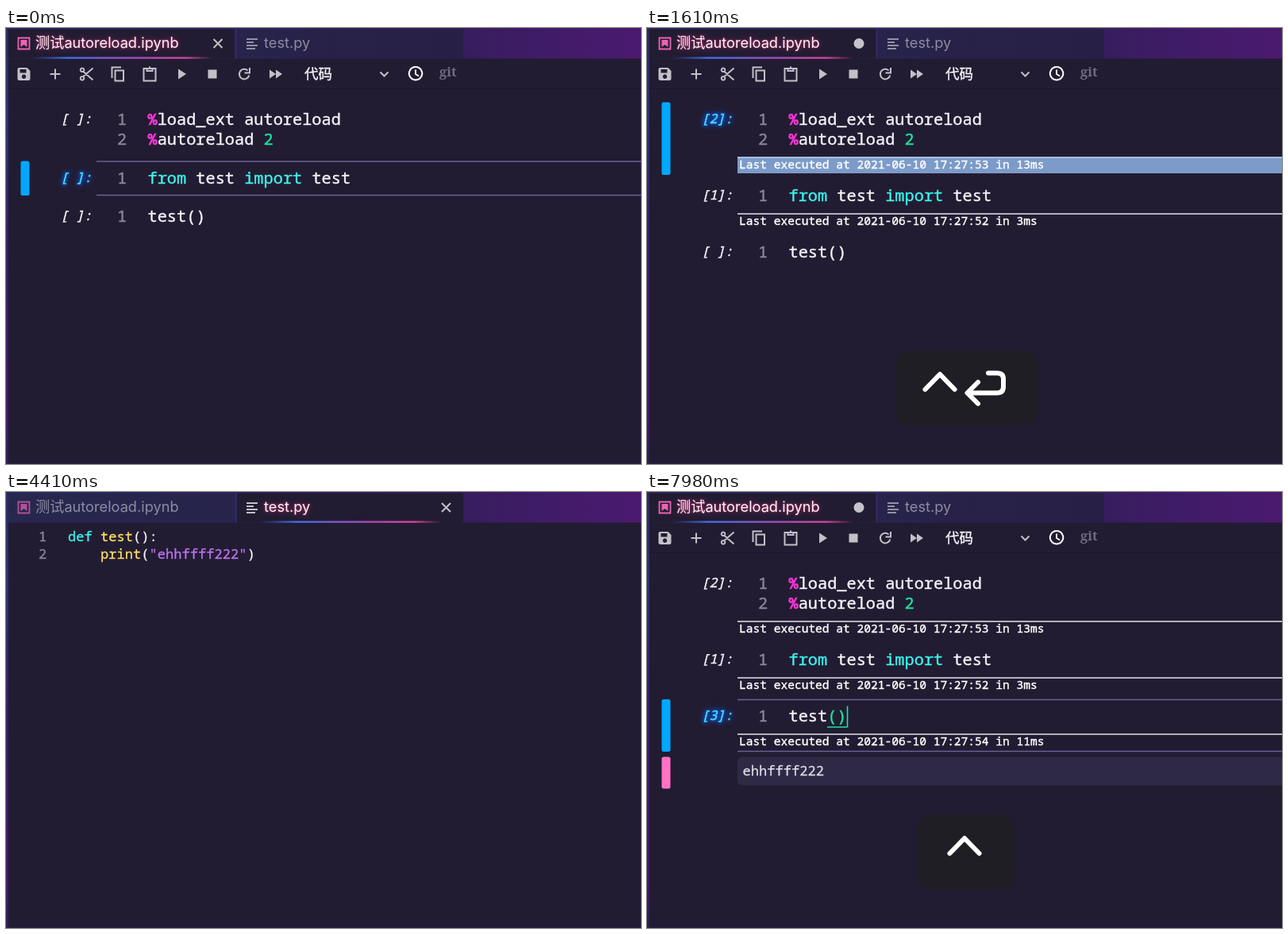
Animation of 800 by 549 pixels, one loop 8000 ms. Source, as an HTML page:

```html
<!DOCTYPE html>
<html lang="zh">
<head>
<meta charset="utf-8">
<title>autoreload</title>
<style>
  html, body { margin: 0; width: 100%; height: 100%; overflow: hidden; background: #221c32; }
  svg { display: block; width: 800px; height: 549px; }
  text {
    white-space: pre; color: #f4f3f8; fill: currentColor; stroke: currentColor; stroke-width: 0;
    font-family: "Noto Sans Mono", "DejaVu Sans Mono", monospace;
  }
  .code { font-size: 20.3px; stroke-width: .4px; }
  .file { font-size: 17.1px; }
  .file text, text.file { stroke-width: .3px; }
  .num { color: #8b8896; }
  .kw { color: #3cf3ec; }
  .magic { color: #ff36dc; font-weight: 700; }
  .lit { color: #18e6a0; }
  .fn { color: #ffe261; }
  .str { color: #bd74f0; }
  .foot { font-size: 14.57px; font-weight: 500; color: #fff; stroke-width: .4px; }
  .prompt { font-size: 16.5px; font-style: italic; stroke-width: .4px; }
  .prompt.on { color: #4fdcff; filter: drop-shadow(0 0 2px #0070ff) drop-shadow(0 0 3px #0050d0); }
  .tab text { font: 18.2px Inter, "Noto Sans CJK SC", "Noto Sans CJK", sans-serif; color: #8f8ba2; }
  .tab.on text { color: #fff0f6; filter: drop-shadow(0 0 1px #e0509099) drop-shadow(0 0 3px #d0287080); }
  .line { fill: none; stroke: #c2c0c8; stroke-width: 2; }
  .solid { fill: #c2c0c8; }
  .key { fill: none; stroke: #fff; stroke-width: 6; stroke-linecap: round; stroke-linejoin: round; }
</style>
</head>
<body>
<svg id="stage" viewBox="0 0 800 549">
  <defs>
    <linearGradient id="edge" x2="0" y2="1">
      <stop offset="0" stop-color="#2d2a60"/><stop offset=".2" stop-color="#2a3670"/>
      <stop offset=".5" stop-color="#3b1d68"/><stop offset=".9" stop-color="#44196a"/>
      <stop offset="1" stop-color="#2c2054"/>
    </linearGradient>
    <linearGradient id="bar">
      <stop offset="0" stop-color="#2c2760"/><stop offset=".7" stop-color="#351d5e"/>
      <stop offset="1" stop-color="#4b1a70"/>
    </linearGradient>
    <linearGradient id="idle" gradientUnits="userSpaceOnUse" x1="0" x2="576">
      <stop offset="0" stop-color="#27284f"/><stop offset="1" stop-color="#281f46"/>
    </linearGradient>
    <linearGradient id="glow">
      <stop offset="0" stop-color="#3b6cf0" stop-opacity="0"/><stop offset=".2" stop-color="#4672ee"/>
      <stop offset=".6" stop-color="#b04cc0"/><stop offset=".85" stop-color="#e0489c"/>
      <stop offset="1" stop-color="#e0489c" stop-opacity="0"/>
    </linearGradient>
  </defs>
  <rect width="800" height="549" fill="#221c32"/>
  <rect width="800" height="38.5" fill="url(#bar)"/>
  <rect width="3" height="549" fill="url(#edge)"/>
  <rect y="548" width="800" height="1" fill="#2a2148"/>
  <g id="tabs"></g>
  <g id="notebook">
    <path d="M3 76.5H800" stroke="#1b1628"/>
    <g id="toolbar"></g>
    <g id="cells"></g>
    <g id="output">
      <rect id="outBar" x="18.5" y="333.5" width="11" height="40" rx="2.5" fill="#ff72c4"/>
      <rect x="114" y="333.5" width="700" height="36" rx="6" fill="#2e2a46"/>
      <text x="120.5" y="357" class="file" style="color:#dedce8">ehhffff222</text>
    </g>
    <path id="cellCaret" d="M227 296H252M252.5 269.5V296.5" stroke="#18e6a0" stroke-width="1.6"/>
  </g>
  <g id="editor" class="file">
    <text x="41" y="62" class="num">1</text>
    <text x="41" y="84" class="num">2</text>
    <text x="78" y="62"><tspan class="kw">def</tspan> <tspan class="fn">test</tspan>():</text>
    <text x="119" y="84"><tspan class="fn">print</tspan>(<tspan class="str" id="literal"></tspan>)</text>
    <rect id="caret" y="68" width="1.6" height="22" fill="#20dba6"/>
  </g>
  <g id="overlay">
    <rect id="plate" y="407" height="93" rx="17" fill="#1f1e24"/>
    <path id="ctrl" class="key" d="M-18.5 455L0 436L18.5 455"/>
    <path id="enter" class="key" d="M417 446L403.5 459.5L417 473M404 459.5H441Q449 459.5 449 451.5V442Q449 434.5 441 434.5H430"/>
    <path id="cmd" class="key" style="stroke-width:5.2" d="M-7-13.5A6.5 6.5 0 1 0-13.5-7H13.5A6.5 6.5 0 1 0 7-13.5V13.5A6.5 6.5 0 1 0 13.5 7H-13.5A6.5 6.5 0 1 0-7 13.5Z"/>
    <text id="keyS" x="412" y="476" style="font:500 61px Inter,sans-serif;color:#fff">S</text>
  </g>
</svg>
<script>
const LOOP = 8000;
const $ = id => document.getElementById(id);
const show = (el, on) => { el.style.display = on ? '' : 'none'; };
const set = (el, attrs) => { for (const k in attrs) el.setAttribute(k, attrs[k]); };
const fade = (t, from, to) => Math.max(0, Math.min(1, (to - t) / (to - from)));
const within = (t, from, to) => t >= from && t < to;

// Times in ms
const T = {
  run: [1330, 420, 2240], pick: [980, 0, 1850],
  openFile: 3780, caret: 4690, erase: 5040, eraseStep: 105,
  save: 6050, back: 6860, edit: 7420
};

// Tabs
const lines = 'M303 14H317M303 18H312M303 22H317M303 26H314';
const tabMarkup = (x, w, name, textX, icon, closeX, glowX) => `
  <g class="tab">
    <rect class="back" x="${x}" y="1.5" width="${w}" height="37"/>
    ${icon}
    <text x="${textX}" y="25">${name}</text>
    <g class="active">
      <rect x="${glowX}" y="36.5" width="228" height="2.2" fill="url(#glow)"/>
      <path class="line close" d="M${closeX - 5.5} 14l11 11m0-11l-11 11"/>
      <circle class="dirty" cx="${closeX}" cy="19.5" r="6.5" fill="#c6c4cb"/>
    </g>
  </g>`;
const bookIcon = `<g class="icon"><path d="M15.5 12.5H29.5V26.5H15.5Z" fill="none" stroke="#ee62b4" stroke-width="1.8"/>
  <path d="M18.5 15H26.5V24L22.5 21L18.5 24Z" fill="#ee62b4"/></g>`;
$('tabs').innerHTML =
  '<rect x="288" y="1.5" width="3" height="37" fill="#302760"/>' +
  tabMarkup(3, 285, '测试autoreload.ipynb', 37, bookIcon, 267, 32) +
  tabMarkup(291, 285, 'test.py', 325, `<path class="line icon" d="${lines}"/>`, 554.5, 320);
const tabs = [...document.querySelectorAll('.tab')];

function drawTab(tab, on, dirty) {
  tab.classList.toggle('on', on);
  set(tab.querySelector('.back'), { fill: on ? '#221c32' : 'url(#idle)' });
  tab.querySelector('.icon').style.opacity = on ? 1 : 0.7;
  show(tab.querySelector('.active'), on);
  show(tab.querySelector('.close'), !dirty);
  show(tab.querySelector('.dirty'), dirty);
}

// Toolbar
const icon = (x, cls, d, extra = '') =>
  `<path class="${cls}" transform="translate(${x} 58)" d="${d}" ${extra}/>`;
$('toolbar').innerHTML = [
  icon(22.5, 'solid', 'M-6-8H4L8-4V6Q8 8 6 8H-6Q-8 8-8 6V-6Q-8-8-6-8ZM-5-6V-1.5H3V-6ZM0 .5A2.7 2.7 0 1 0 .1 .5Z', 'fill-rule="evenodd"'),
  icon(62, 'line', 'M-6.5 0H6.5M0-6.5V6.5'),
  icon(101.5, 'line', 'M-4 3L8-7.5M-4-3L8 7.5M-5.5-7.5a2.3 2.3 0 1 0 .1 0M-5.5 3a2.3 2.3 0 1 0 .1 0'),
  icon(141, 'line', 'M-3.5-4.5H7V8.5H-3.5ZM-7.5 5V-8.5H4'),
  icon(181, 'line', 'M-7.5-7H7.5V8.5H-7.5ZM-3.5-7V-4H3.5V-7M-1-8.5H1'),
  icon(222, 'solid', 'M-5-6.5L5 0L-5 6.5Z'),
  icon(260, 'solid', 'M-5.5-5.5H5.5V5.5H-5.5Z'),
  icon(300, 'line', 'M4.5-4.5A6.3 6.3 0 1 0 6.3 1.5M7-8V-1.5H.5'),
  icon(340, 'solid', 'M-8-5.5L0 0L-8 5.5ZM0-5.5L8 0L0 5.5Z'),
  icon(476.5, 'line', 'M-5-2.5L0 2.5L5-2.5'),
  icon(516, 'line', 'M0-9A8.2 8.2 0 1 0 .1-9M0-5.5V0L4 2.5', 'style="stroke:#fff"'),
  '<text x="376" y="63.5" style="font:500 17.5px \'Noto Sans CJK SC\',\'Noto Sans CJK\',sans-serif;stroke-width:.4px">代码</text>',
  '<text x="546" y="60.5" style="font:700 16.5px \'Noto Serif\',serif;color:#6f6b7c">git</text>'
].join('');

// Notebook cells, each drawn with its first code line centred on y = 0
const kw = s => `<tspan class="kw">${s}</tspan>`;
const magic = '<tspan class="magic">%</tspan>';
const cellData = [
  { n: 2, rows: [magic + 'load_ext autoreload', magic + 'autoreload <tspan class="lit">2</tspan>'], foot: '53 in 13ms' },
  { n: 1, rows: [kw('from') + ' test ' + kw('import') + ' test'], foot: '52 in 3ms' },
  { n: 3, rows: ['test<tspan class="paren">()</tspan>'], foot: '54 in 11ms' }
];
$('cells').innerHTML = cellData.map(({ rows, foot }) => {
  const end = 22.5 + (rows.length - 1) * 25.5;
  const code = rows.map((row, i) => `
    <text x="140" y="${7 + i * 25.5}" class="code num">${i + 1}</text>
    <text x="178.5" y="${7 + i * 25.5}" class="code">${row}</text>`).join('');
  return `<g class="cell">
    <rect class="bar" x="18.5" y="-21" width="11" rx="2.5" fill="#00a8ff"/>
    <path class="frame" stroke="#67609a" stroke-width="1.4"/>
    <text class="prompt" x="68.5" y="5"></text>${code}
    <g class="done">
      <path d="M114 ${end + .5}H800" stroke="#e4e3e8" stroke-width="1.4"/>
      <rect class="flash" x="114" y="${end}" width="686" height="20.5" fill="#9dc9ff"/>
      <text x="116" y="${end + 14.3}" class="foot">Last executed at 2021-06-10 17:27:${foot}</text>
    </g></g>`;
}).join('');
const cells = [...document.querySelectorAll('.cell')];

function drawCells(t) {
  const selected = t < T.pick[0] ? 1 : t < T.pick[2] ? 0 : 2;
  const editing = t < T.run[1] || t >= T.edit;
  let y = 114.5;
  cells.forEach((cell, i) => {
    const part = name => cell.querySelector('.' + name);
    const { n, rows } = cellData[i];
    const ran = t >= T.run[i], on = i === selected;
    const bottom = 22.5 + (rows.length - 1) * 25.5 + (ran ? 22.5 : 0);
    set(cell, { transform: `translate(0 ${y})` });
    set(part('bar'), { height: bottom + 21 });
    set(part('frame'), { d: `M114-20.5H800M114 ${bottom - .5}H800` });
    show(part('bar'), on);
    show(part('frame'), on && editing);
    show(part('done'), ran);
    part('flash').style.opacity = fade(t, T.run[i] + 150, T.run[i] + 650);
    part('prompt').textContent = `[${ran ? n : ' '}]:`;
    part('prompt').classList.toggle('on', on);
    y += bottom + 26;
  });
  show($('output'), t >= T.run[2]);
  $('outBar').style.opacity = 0.28 + 0.72 * (1 - fade(t, T.run[2] + 70, T.run[2] + 280));
  show($('cellCaret'), t >= T.edit);
  document.querySelector('.paren').classList.toggle('lit', t >= T.edit);
}

function drawEditor(t) {
  const erased = Math.max(0, Math.min(7, Math.floor((t - T.erase) / T.eraseStep) + 1));
  const word = 'ehhffff222'.slice(0, 10 - erased);
  $('literal').textContent = `"${word}"`;
  set($('caret'), { x: 78 + 10.26 * (11 + word.length) });
  show($('caret'), t >= T.caret);
}

function drawKeys(t) {
  const ctrl = within(t, 210, 3460) || t >= 7840;
  const enter = within(t, 350, 3460);
  const cmd = within(t, 5880, 7180);
  const s = within(t, 6020, 7180);
  const wide = enter || s;
  show($('overlay'), ctrl || cmd);
  show($('ctrl'), ctrl);
  show($('enter'), enter);
  show($('cmd'), cmd);
  show($('keyS'), s);
  set($('plate'), wide ? { x: 312, width: 180 } : { x: 341, width: 122 });
  set($('ctrl'), { transform: `translate(${wide ? 369 : 400} 0)` });
  set($('cmd'), { transform: `translate(${wide ? 374 : 400} 454.5)` });
  $('overlay').style.opacity = enter ? fade(t, 3190, 3460) : cmd ? fade(t, 6900, 7180) : 1;
}

function render(t) {
  const fileOpen = within(t, T.openFile, T.back);
  drawTab(tabs[0], !fileOpen, t >= T.run[1]);
  drawTab(tabs[1], fileOpen, within(t, T.erase, T.save));
  show($('notebook'), !fileOpen);
  show($('editor'), fileOpen);
  drawCells(t);
  drawEditor(t);
  drawKeys(t);
}

const start = performance.now();
function tick() {
  render((performance.now() - start) % LOOP);
  requestAnimationFrame(tick);
}
tick();
</script>
</body>
</html>
```
